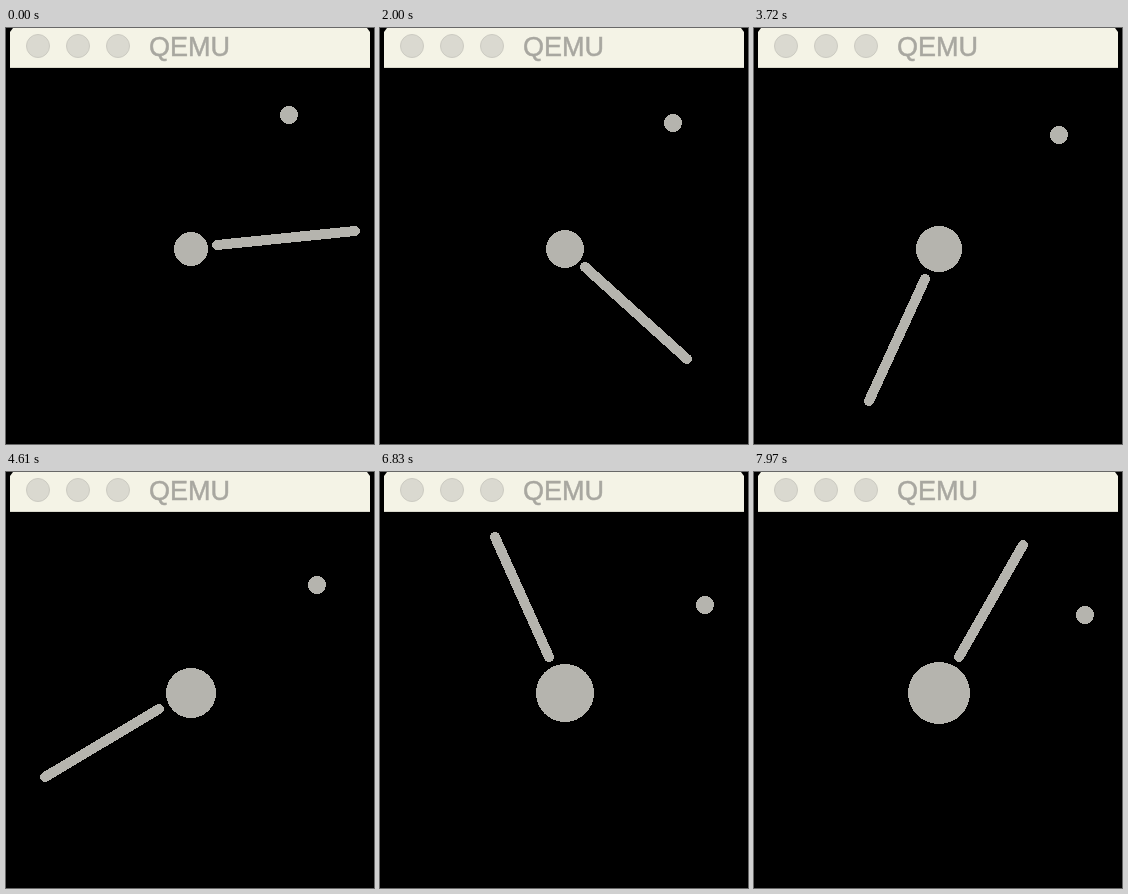
Write an HTML page that moves like this. It is 368 by 416 pixels and loops after 8000 ms.

```html
<!DOCTYPE html>
<html lang="en">
<head>
<meta charset="utf-8">
<title>Clock</title>
<style>
  html, body { margin: 0; width: 100%; height: 100%; overflow: hidden; background: #000; }
  svg { display: block; width: 368px; height: 416px; }
  text { font: 27px "Liberation Sans", Arial, sans-serif; fill: #a8a7a0; stroke: #a8a7a0; stroke-width: .5; }
  .clock { fill: #b5b4ae; shape-rendering: crispEdges; }
  .button { fill: #dad9d0; stroke: #cccbc2; }
  #hand { stroke: #b5b4ae; stroke-width: 10; stroke-linecap: round; }
</style>
</head>
<body>
<svg viewBox="0 0 368 416">
  <path d="M4 40V4L7 0H361L364 4V40Z" fill="#f4f3e6"/>
  <path d="M4 39.5H364" stroke="#d9d8cc"/>
  <g class="button">
    <circle cx="32" cy="18" r="11.5"/>
    <circle cx="72" cy="18" r="11.5"/>
    <circle cx="112" cy="18" r="11.5"/>
  </g>
  <text x="143" y="28">QEMU</text>
  <g class="clock">
    <circle id="hub" cx="185" cy="221"/>
    <circle id="hour" r="9"/>
    <line id="hand"/>
  </g>
</svg>
<script>
  const LOOP = 8000, START = 14;
  const PIVOT = { x: 184, y: 220 };

  // The clock's uneven pace: [time, minute], linear in between.
  const PACE = [
    [20, START], [720, 19], [1030, 20], [1600, 21], [2320, 24],
    [4420, 39], [5710, 46], [6830, 56], [7930, 65]
  ];

  const [hub, hour, hand] = ["hub", "hour", "hand"].map(id => document.getElementById(id));

  // Everything sits on a grid of two-pixel cells.
  const snap = v => 2 * Math.round((v - 1) / 2) + 1;

  function polar(degrees, radius) {
    const a = degrees * Math.PI / 180;
    return [snap(PIVOT.x + radius * Math.sin(a)), snap(PIVOT.y - radius * Math.cos(a))];
  }

  function minuteAt(time) {
    const next = PACE.findIndex(([at]) => at > time);
    if (next === 0) return START;
    if (next < 0) return PACE[PACE.length - 1][1];
    const [t0, m0] = PACE[next - 1], [t1, m1] = PACE[next];
    return Math.floor(m0 + (m1 - m0) * (time - t0) / (t1 - t0) + 1e-6);
  }

  function setAll(el, attrs) {
    for (const name in attrs) el.setAttribute(name, attrs[name]);
  }

  function draw(time) {
    const minute = minuteAt(time);
    const radius = snap(17 + (minute - START) * 0.275);
    const [cx, cy] = polar(30 + minute / 2, 166);
    const [x1, y1] = polar(minute * 6, radius + 10);
    const [x2, y2] = polar(minute * 6, 162 + radius / 4);
    setAll(hub, { r: radius });
    setAll(hour, { cx, cy });
    setAll(hand, { x1, y1, x2, y2 });
  }

  const begin = performance.now();
  function frame() {
    draw((performance.now() - begin) % LOOP);
    requestAnimationFrame(frame);
  }
  frame();
</script>
</body>
</html>
```
